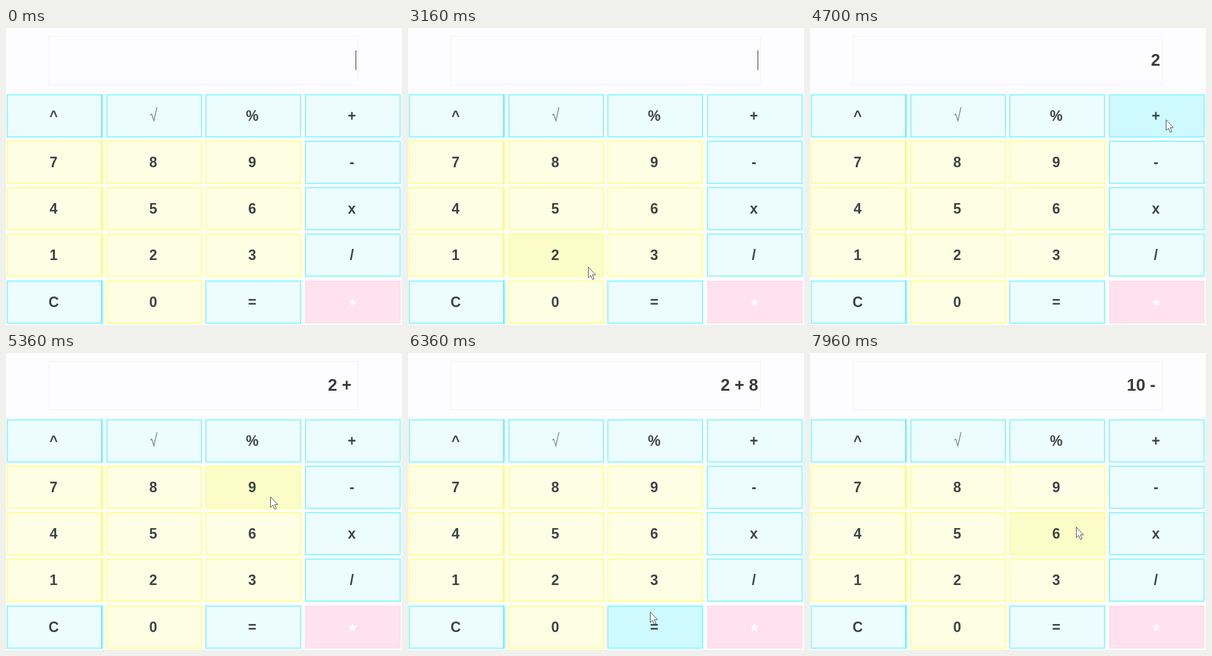
These frames come from a looping animation (640x480 px, 8 s). An HTML page:

```html
<!DOCTYPE html>
<html lang="en">
<head>
<meta charset="utf-8">
<title>Calculator</title>
<style>
html, body { margin: 0; width: 100%; height: 100%; overflow: hidden; background: #fdfdff; }
svg { display: block; }
text { font: bold 23px "Liberation Sans", Arial, sans-serif; text-anchor: middle; fill: #3c4444; }
#display { font-size: 27px; text-anchor: end; fill: #3c3c3c; white-space: pre; }
</style>
</head>
<body>
<svg width="640" height="480" viewBox="0 0 640 480">
  <rect x="69.5" y="13.5" width="500" height="78" fill="none" stroke="#f1f3f5"/>
  <text id="display" x="566" y="61"></text>
  <path id="caret" d="M565.5 36V68" stroke="#303030"/>
  <g id="keys"></g>
  <path id="pointer" d="M.5 .5V17.5L4.3 13.9L7.2 20.5L9.8 19.4L7 12.9H12.2Z" fill="#fff" stroke="#505050"/>
</svg>
<script>
const $ = id => document.getElementById(id);
const LOOP = 8000, W = 155, H = 70;

const styles = {
  digit: { fill: '#fefee4', hover: '#fcfcc8', line: '#ffff90', edge: '#ffff30' },
  op: { fill: '#edfcff', hover: '#cdf9ff', line: '#8cf8ff', edge: '#38f8ff' },
  star: { fill: '#ffe2ee', hover: '#ffd4e6', line: '#ffd4e4' }
};

function add(tag, attrs, content = '') {
  const el = document.createElementNS('http://www.w3.org/2000/svg', tag);
  for (const name in attrs) el.setAttribute(name, attrs[name]);
  el.textContent = content;
  return $('keys').appendChild(el);
}

function starPoints(cx, cy) {
  return Array.from({ length: 10 }, (_, i) => {
    const r = i % 2 ? 3.2 : 7, a = (i / 5 - 0.5) * Math.PI;
    return [cx + r * Math.cos(a), cy + r * Math.sin(a)].join();
  }).join(' ');
}

const keys = [...'^√%+789-456x123/C0=*'].map((label, i) => {
  const col = i % 4, x = Math.round(1 + col * 160.7), y = Math.round(106.5 + (i >> 2) * 75.3);
  const kind = /\d/.test(label) ? 'digit' : label === '*' ? 'star' : 'op';
  const style = styles[kind];
  const box = add('rect', {
    x: x + 1, y: y + 1, width: W - 2, height: H - 2,
    stroke: style.line, 'stroke-width': kind === 'star' ? 1 : 2
  });
  // The first column has a stronger right edge.
  if (col === 0) add('path', { d: `M${x + W - 1} ${y}v${H}`, 'stroke-width': 2, stroke: style.edge });
  if (label === '√') {
    add('path', { d: 'M233 141l2.5-2 3.5 11 5-22', fill: 'none', stroke: '#6c8890', 'stroke-width': 1.3 });
  } else if (label === '*') {
    add('polygon', { points: starPoints(560, 444), fill: '#fff' });
  } else {
    add('text', { x: x + W / 2 - 1.5, y: y + 43 }, label);
  }
  return { x, y, box, style };
});

// Pointer moves: start and end time, bend, destination
const home = [342, 404];
const moves = [
  { from: 2160, to: 2560, bend: [350, 409], end: [337, 403] },
  { from: 2930, to: 3530, bend: [300, 390], end: [236, 362] },
  { from: 3730, to: 4530, bend: [481, 437], end: [575, 148] },
  { from: 4860, to: 5700, bend: [681, 274], end: [234, 213] },
  { from: 5860, to: 6660, bend: [466, 392], end: [360, 452] },
  { from: 6930, to: 7560, bend: [500, 400], end: [575, 218] },
  { from: 7800, to: 8400, bend: [367, 327], end: [238, 300] }
];
const readouts = [[0, ''], [3730, '2'], [4860, '2 + '], [5860, '2 + 8'], [6930, '10'], [7800, '10 - ']];

const easeOut = k => 1 - (1 - k) ** 1.5;

function tipAt(t) {
  const i = moves.findLastIndex(m => m.from <= t);
  if (i < 0) return null;
  const { from, to, bend, end } = moves[i];
  const start = i ? moves[i - 1].end : home;
  const u = easeOut(Math.min(1, (t - from) / (to - from))), v = 1 - u;
  return start.map((s, axis) => Math.round(v * v * s + 2 * u * v * bend[axis] + u * u * end[axis]));
}

function draw(t) {
  const tip = tipAt(t);
  const value = readouts.findLast(r => r[0] <= t)[1];
  $('display').textContent = value;
  $('caret').style.display = value ? 'none' : '';
  $('pointer').style.display = tip ? '' : 'none';
  if (tip) $('pointer').setAttribute('transform', `translate(${tip})`);
  for (const { x, y, box, style } of keys) {
    const over = tip && tip[0] >= x && tip[0] < x + W && tip[1] >= y && tip[1] < y + H;
    box.setAttribute('fill', over ? style.hover : style.fill);
  }
}

const start = performance.now();
function tick() {
  draw((performance.now() - start) % LOOP);
  requestAnimationFrame(tick);
}
tick();
</script>
</body>
</html>
```
